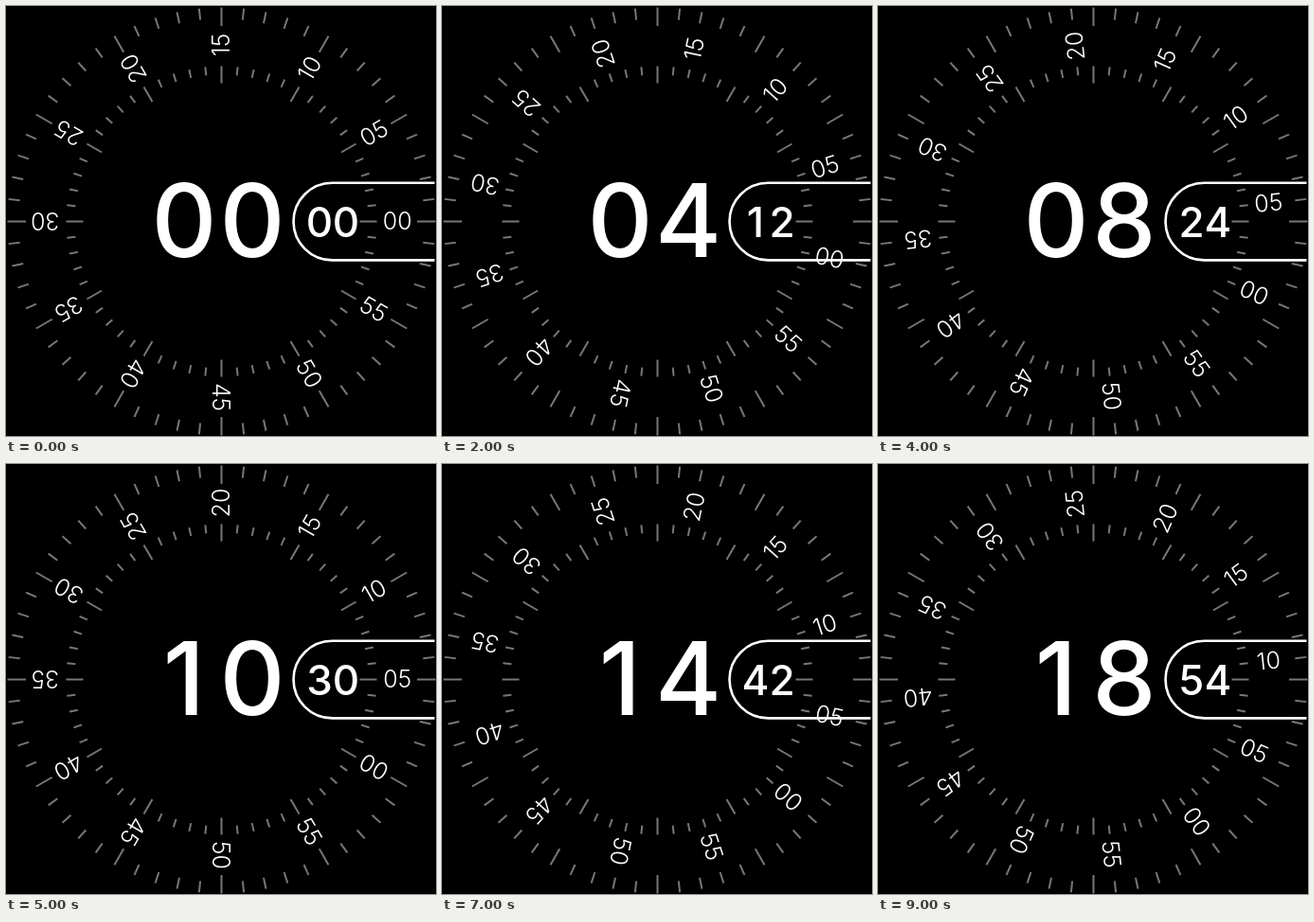
These frames come from a looping animation (454 px wide and 454 px high, 10000 ms). An HTML page:

```html
<!DOCTYPE html>
<html lang="en">
<head>
<meta charset="utf-8">
<title>Radial clock</title>
<style>
  html, body { margin: 0; width: 100%; height: 100%; overflow: hidden; background: #000; }
  svg { display: block; width: 100%; height: 100%; }
  text { fill: #fff; text-anchor: middle; font-family: Inter, Lato, sans-serif; }
  #ticks { stroke: #777; stroke-width: 2; }
  #ring text { font-size: 25px; font-weight: 350; }
  #hours text { font-size: 107px; font-weight: 500; }
  #minutes text { font-size: 44px; font-weight: 500; }
  #pill { fill: none; stroke: #fff; stroke-width: 2.6; }
</style>
</head>
<body>
<svg viewBox="0 0 454 454">
  <g id="ticks" transform="translate(227.5 227.5)"></g>
  <g id="ring" transform="translate(227.3 227)"></g>
  <path id="pill" d="M452.5 186.8H344.3a40.8 40.8 0 0 0 0 81.6H452.5"/>
  <g id="hours"><text x="188" y="265"/><text x="260" y="265"/></g>
  <g id="minutes"><text x="331" y="243.6"/><text x="359" y="243.6"/></g>
</svg>
<script>
const $ = id => document.getElementById(id);
const pad = n => String(n).padStart(2, '0');

function add(parent, tag, attrs) {
  const el = document.createElementNS('http://www.w3.org/2000/svg', tag);
  for (const name in attrs) el.setAttribute(name, attrs[name]);
  return parent.appendChild(el);
}

function addTick(angle, from, to) {
  add($('ticks'), 'line', { x1: from, x2: to, transform: `rotate(${angle})` });
}

for (let i = 0; i < 60; i++) {
  const major = i % 5 === 0;
  addTick(i * 6, major ? 206.5 : 214, 226);
  addTick(i * 6, major ? 146 : 155, 164);
}

const labels = Array.from({ length: 12 }, (_, i) => {
  const label = add($('ring'), 'text', { x: 186, y: 9 });
  label.textContent = pad(i * 5);
  return label;
});

function showDigits(group, value) {
  [...pad(value)].forEach((digit, i) => group.children[i].textContent = digit);
}

function draw(step) {
  showDigits($('hours'), step * 2);
  showDigits($('minutes'), step * 6);
  labels.forEach((label, i) =>
    label.setAttribute('transform', `rotate(${step * 6 - i * 30})`));
}

let start, shown;
function frame(now) {
  start ??= now;
  const step = Math.floor((now - start) / 1000) % 10;
  if (step !== shown) draw(shown = step);
  requestAnimationFrame(frame);
}
draw(shown = 0);
requestAnimationFrame(frame);
</script>
</body>
</html>
```
